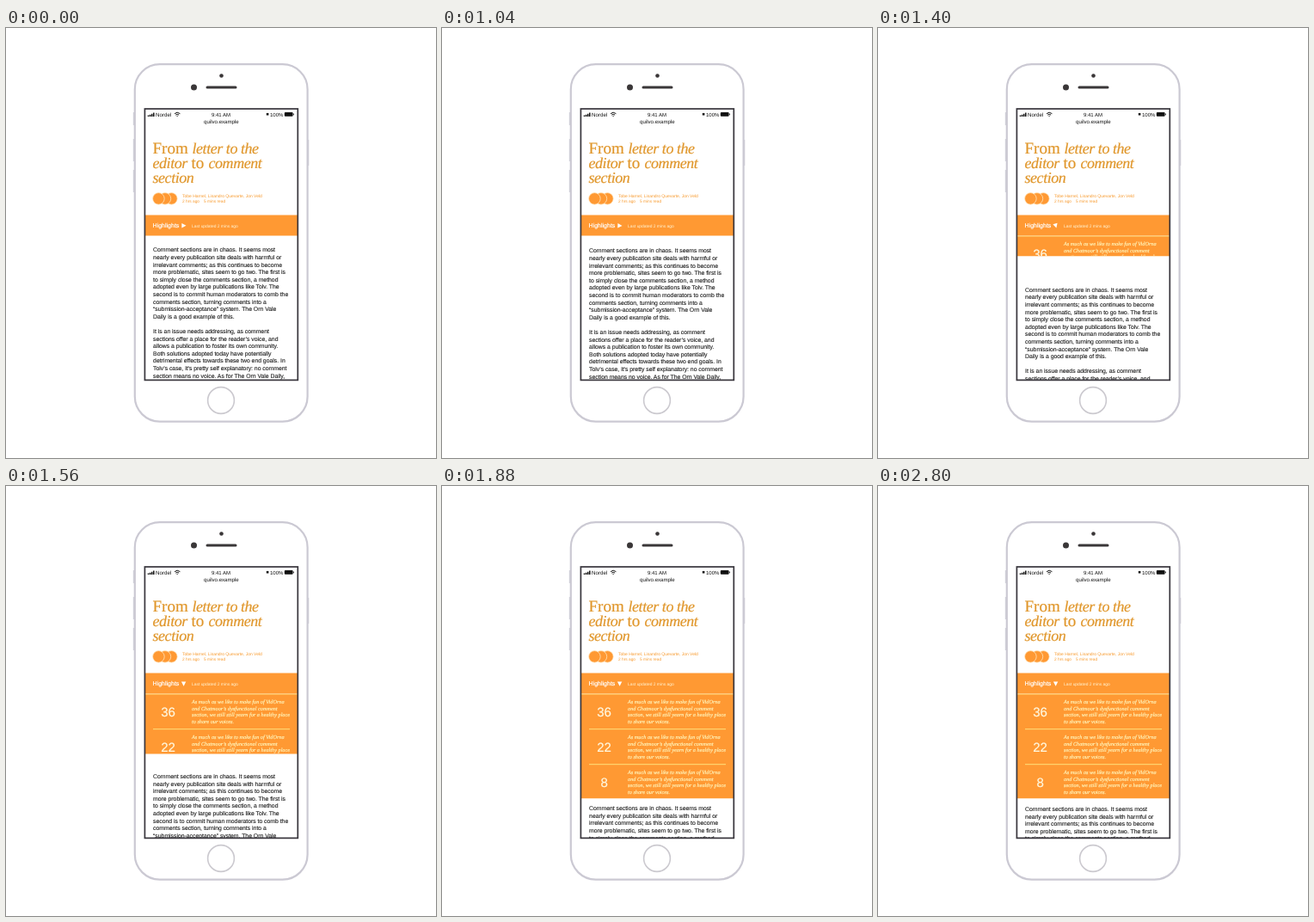
These frames come from a looping animation (500x500 px, 2840 ms). An HTML page:

```html
<!DOCTYPE html>
<html lang="en">
<head>
<meta charset="utf-8">
<style>
  html, body { margin: 0; width: 100%; height: 100%; overflow: hidden; background: #fff; }
  svg { display: block; width: 100%; height: 100%; }
  text { font-family: "Liberation Sans", Arial, sans-serif; text-rendering: geometricPrecision; white-space: pre; }
  .title text { font: 19px "Liberation Serif", serif; fill: #e0962a; stroke: #e0962a; stroke-width: .2; }
  .title .it { font-size: 18px; font-style: italic; letter-spacing: -.45px; }
  .status { font-size: 6px; fill: #111; }
  .byline { font-size: 5px; fill: #f79a2e; }
  .body { font-size: 6.84px; fill: #1c1c1c; stroke: #1c1c1c; stroke-width: .1; }
  .quote text { font: italic 6.25px "Liberation Serif", serif; fill: #fff0b4; stroke: #fff0b4; stroke-width: .2; }
  .quote .count { font: 15px "Liberation Sans", Arial, sans-serif; fill: #fff8e0; stroke: #fff8e0; text-anchor: middle; }
  .rule { stroke: #ffe07a; stroke-width: 1; }
</style>
</head>
<body>
<svg viewBox="0 0 500 500">
  <defs>
    <clipPath id="screen"><rect x="162" y="94" width="177" height="315"/></clipPath>
    <clipPath id="reveal"><rect id="revealBox" x="162" y="241.5" width="177" height="0"/></clipPath>
  </defs>

  <!-- Phone -->
  <path d="M148.5 98v15M148.5 129v26M148.5 165v26M351.6 130v30" stroke="#d3d1da" stroke-width="1.4"/>
  <rect x="149.8" y="42.2" width="200.8" height="415.4" rx="29" fill="#fff" stroke="#cbc9d3" stroke-width="2.2"/>
  <g fill="#3a3738">
    <circle cx="250.5" cy="55.5" r="2.3"/>
    <circle cx="218.5" cy="69" r="3.5"/>
    <rect x="232.5" y="67.5" width="36" height="3" rx="1.5"/>
  </g>
  <circle cx="250" cy="433" r="15.4" fill="#fff" stroke="#cbc9cf" stroke-width="1.6"/>

  <g clip-path="url(#screen)">
    <g id="article" class="body"></g>

    <!-- Status bar -->
    <g class="status">
      <path d="M165.5 103v-1.4M167.6 103v-2.3M169.7 103v-3.3M171.8 103v-4.4" stroke="#111" stroke-width="1.5"/>
      <text x="174" y="103.2" font-size="6.2">Nordel</text>
      <path d="M196 99.6q3.2-2.8 6.4 0M197.3 101.1q1.9-1.7 3.8 0M198.6 102.5q.6-.5 1.2 0" fill="none" stroke="#111"/>
      <text x="250" y="103.2" text-anchor="middle">9:41 AM</text>
      <rect x="302.8" y="98.9" width="2.6" height="2.6"/>
      <text x="307" y="103.2">100%</text>
      <rect x="323.8" y="98" width="9.8" height="4.8" rx="1"/>
      <rect x="334" y="99.5" width=".8" height="1.8"/>
      <text x="250.4" y="111" text-anchor="middle" style="font-size:6.1px">quilvo.example</text>
    </g>

    <g class="title" transform="translate(0 -.4)">
      <text x="170.5" y="146.5">From</text><text class="it" x="216.5" y="146.5">letter to the</text>
      <text class="it" x="170.5" y="163.5">editor</text><text x="215.5" y="163.5">to</text><text class="it" x="235.5" y="163.5">comment</text>
      <text class="it" x="170.5" y="180.5">section</text>
    </g>

    <g fill="#ff9933" stroke="#fff0d0" stroke-width=".7">
      <circle cx="192.4" cy="198.4" r="6.8"/>
      <circle cx="184.9" cy="198.4" r="6.8"/>
      <circle cx="177.4" cy="198.4" r="6.8"/>
    </g>
    <g class="byline">
      <text x="205" y="197.4">Tobe Harnel, Lisandro Quevarte, Jon Veld</text>
      <text x="205" y="203.4" font-size="4.8">2 hrs ago</text>
      <text x="230" y="203.4" font-size="4.8">5 mins read</text>
    </g>

    <!-- Highlights -->
    <rect x="162" y="217.5" width="177" height="24" fill="#ff9933"/>
    <text x="170.6" y="232.3" font-size="7" fill="#fff" stroke="#fff" stroke-width=".2">Highlights</text>
    <path id="arrow" d="M-2.3-2.7L2.9 0L-2.3 2.7z" fill="#fff"/>
    <text x="216" y="232" font-size="4.93" fill="#fff6d8">Last updated 2 mins ago</text>
    <g id="panel" class="quote" clip-path="url(#reveal)">
      <rect x="162" y="241.5" width="177" height="122" fill="#ff9933"/>
      <path class="rule" d="M162 242H339M171 282.7H330M171 323.7H330"/>
    </g>
  </g>

  <rect x="161.4" y="94" width="177.9" height="315.4" fill="none" stroke="#38353c" stroke-width="1.7"/>
</svg>

<script>
const LOOP = 2840;
const $ = id => document.getElementById(id);

function addText(parent, x, y, content, className = "") {
  const node = document.createElementNS("http://www.w3.org/2000/svg", "text");
  node.setAttribute("x", x);
  node.setAttribute("y", y);
  node.setAttribute("class", className);
  node.textContent = content;
  parent.append(node);
}

const article = `Comment sections are in chaos. It seems most
nearly every publication site deals with harmful or
irrelevant comments; as this continues to become
more problematic, sites seem to go two. The first is
to simply close the comments section, a method
adopted even by large publications like Tolv. The
second is to commit human moderators to comb the
comments section, turning comments into a
“submission-acceptance” system. The Orn Vale
Daily is a good example of this.

It is an issue needs addressing, as comment
sections offer a place for the reader’s voice, and
allows a publication to foster its own community.
Both solutions adopted today have potentially
detrimental effects towards these two end goals. In
Tolv’s case, it’s pretty self explanatory: no comment
section means no voice. As for The Orn Vale Daily,`;
article.split("\n").forEach((line, i) => addText($("article"), 171.1, 260.4 + i * 8.6, line));

const quote = [
  "As much as we like to make fun of VidOrna",
  "and Chatmoor’s dysfunctional comment",
  "section, we still still yearn for a healthy place",
  "to share our voices."
];
[36, 22, 8].forEach((count, row) => {
  const top = row * 41;
  addText($("panel"), 188.6, 267.6 + top, count, "count");
  quote.forEach((line, i) => addText($("panel"), 216, 253 + top + i * 7.6, line));
});

// Progress between two times along cubic-bezier(.42, 0, .58, 1)
function easeInOut(time, start, end) {
  const x = Math.min(1, Math.max(0, (time - start) / (end - start)));
  let low = 0, high = 1, u = x;
  for (let i = 0; i < 16; i++) {
    u = (low + high) / 2;
    const curveX = 1.26 * u * (1 - u) ** 2 + 1.74 * u * u * (1 - u) + u ** 3;
    if (curveX < x) low = u; else high = u;
  }
  return u * u * (3 - 2 * u);
}

function draw(now) {
  const time = now % LOOP;
  $("article").setAttribute("transform", `translate(0 ${117.6 * easeInOut(time, 980, 1940)})`);
  $("revealBox").setAttribute("height", 122 * easeInOut(time, 1194, 1870));
  $("arrow").setAttribute("transform", `translate(206.6 229.8) rotate(${90 * easeInOut(time, 980, 1580)})`);
  requestAnimationFrame(draw);
}
draw(performance.now());
</script>
</body>
</html>
```
